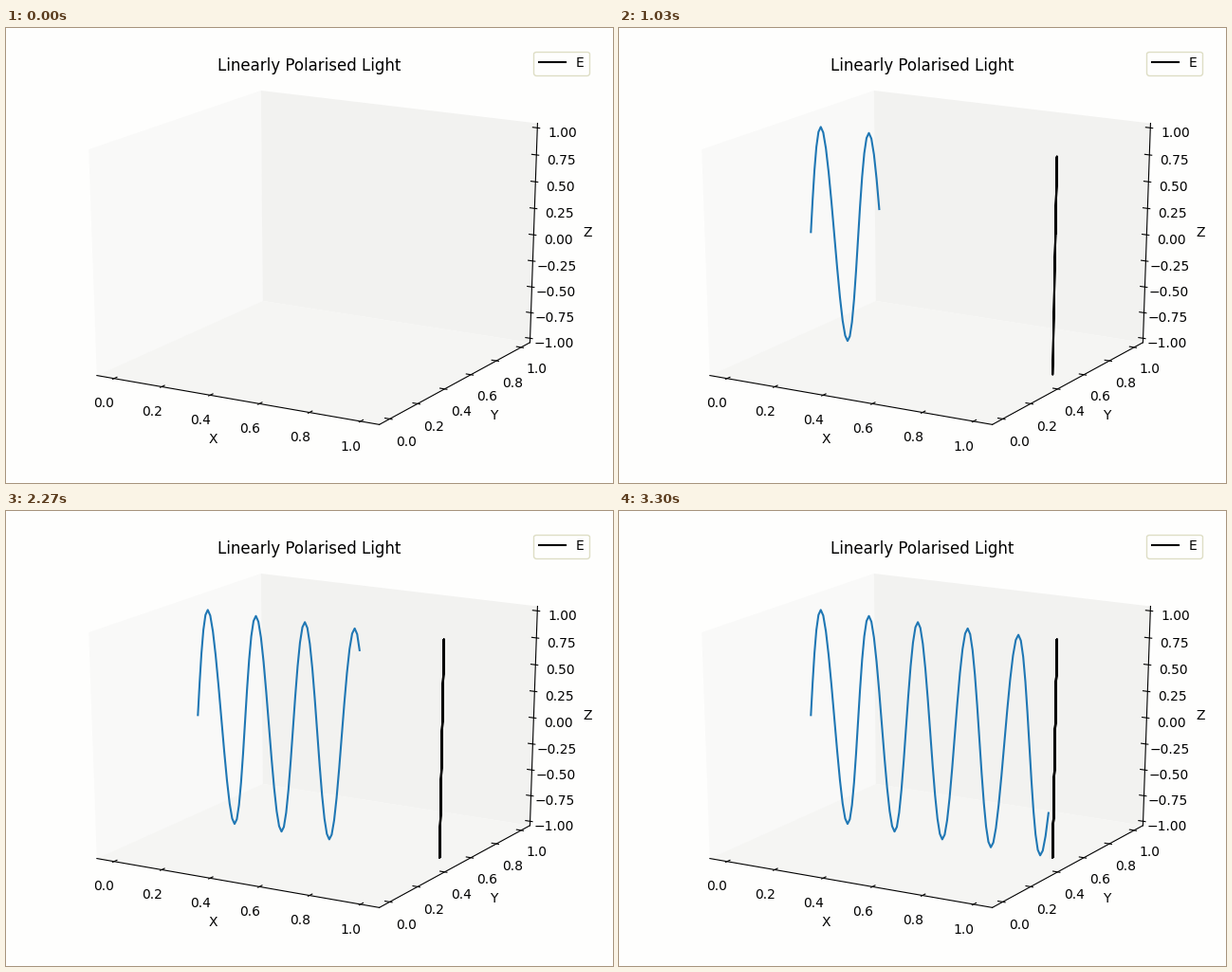
A matplotlib script for the animation above (3330 ms loop, 640 by 480 pixels).

```python
import numpy as np
import matplotlib.pyplot as plt
from matplotlib.animation import FuncAnimation

W, H = 640, 480
LEFT, RIGHT, TOP, BOTTOM = 18.0, 622.0, 17.7, 461.4
FRAMES, LOOP = 100, 3330
DIST = 10
ELEV, AZIM = np.radians(20), np.radians(-60)
PANE = 0.5 + 1 / 48          # wall position in unit-cube coordinates
LABEL_GAP = 0.06
TICK_OUT, TICK_IN = 0.1 / 12, 0.2 / 12
PAPER = "#fefefd"

ca, sa, ce, se = np.cos(AZIM), np.sin(AZIM), np.cos(ELEV), np.sin(ELEV)
VIEW = np.array([[-sa, ca, 0],
                 [-ca * se, -sa * se, ce],
                 [ca * ce, sa * ce, se]])
SCALE_X = (RIGHT - LEFT) / 1.85
SCALE_Y = (BOTTOM - TOP) / 1.85
CX, CY = LEFT + 0.95 * SCALE_X, TOP + 0.90 * SCALE_Y


def project(points):
    """Centred unit-cube points to pixels, y pointing down."""
    right, up, near = VIEW @ np.asarray(points, float).T
    f = 1 / (1 - near / DIST)
    return np.column_stack([CX + SCALE_X * right * f, CY - SCALE_Y * up * f])


def unit(x, y, z):
    """Data coordinates to centred unit-cube coordinates."""
    x, y, z = np.broadcast_arrays(x, y, z)
    return np.column_stack([(x + 0.05) / 1.1 - 0.5,
                            (y + 0.05) / 1.1 - 0.5,
                            z / 2])


plt.rcParams["font.family"] = "DejaVu Sans"
fig = plt.figure(figsize=(W / 100, H / 100), dpi=100, facecolor=PAPER)
ax = fig.add_axes([LEFT / W, 1 - BOTTOM / H,
                   (RIGHT - LEFT) / W, (BOTTOM - TOP) / H])
ax.set_xlim(LEFT, RIGHT)
ax.set_ylim(BOTTOM, TOP)
ax.axis("off")
ax.set_title("Linearly Polarised Light", y=0.92, pad=6, fontsize=12)


def wall(axis, side, color):
    square = np.array([(-1, -1), (1, -1), (1, 1), (-1, 1)]) * PANE
    corners = np.insert(square, axis, side * PANE, axis=1)
    ax.fill(*project(corners).T, color=color, lw=0, zorder=1)


wall(0, -1, "#f9f9f8")
wall(1, 1, "#f2f2f0")
wall(2, -1, "#f5f5f3")


def draw_axis(axis, base, ticks, fmt, tick_dir, away):
    """Axis line along one cube edge, with ticks and their labels."""
    ends = np.array([base, base], float) * PANE
    ends[:, axis] = -PANE, PANE
    ax.plot(*project(ends).T, color="k", lw=0.8, zorder=2)
    step = np.zeros(3)
    step[tick_dir] = np.sign(base[tick_dir])
    for t in ticks:
        pos = np.array(base, float) * PANE
        pos[axis] = unit(t, t, t)[0, axis]
        mark = project([pos + step * TICK_OUT, pos - step * TICK_IN])
        ax.plot(*mark.T, color="k", lw=0.8, zorder=2)
        x, y = project([pos + np.array(away) * LABEL_GAP])[0]
        ax.text(x, y + 0.6, fmt.format(t).replace("-", "\u2212"),
                ha="center", va="top", fontsize=10)


fifths = np.linspace(0, 1, 6)
draw_axis(0, (0, -1, -1), fifths, "{:.1f}", 1, (0, -1, -1))
draw_axis(1, (1, 0, -1), fifths, "{:.1f}", 0, (1, 0, -1))
draw_axis(2, (1, 1, 0), np.linspace(-1, 1, 9), "{:.2f}", 0, (1, 1, 0))
for name, x, y in (("X", 218, 438), ("Y", 514.5, 413), ("Z", 613, 219.5)):
    ax.text(x, y, name, ha="center", va="baseline", fontsize=10)

# Travelling wave and the trace its tip leaves in the x = 1 plane
xs = np.arange(FRAMES) / 100
zs = np.sin(10 * np.pi * xs)
path = project(unit(xs, 0.5, zs))
trace = project(unit(1.0, 0.5, zs))

wave, = ax.plot([], [], color="#1f77b4", lw=1.5, zorder=3)
field, = ax.plot([], [], color="k", lw=1.5, zorder=4, label="E")
ax.legend(handles=[field], loc="upper right", fontsize=10,
          facecolor=PAPER, edgecolor="#d6d6b8")


def update(n):
    wave.set_data(*path[:n].T)
    field.set_data(*trace[:n].T)
    return wave, field


anim = FuncAnimation(fig, update, frames=FRAMES, interval=LOOP / FRAMES,
                     init_func=lambda: update(0), repeat=True, repeat_delay=0)
plt.show()
```
